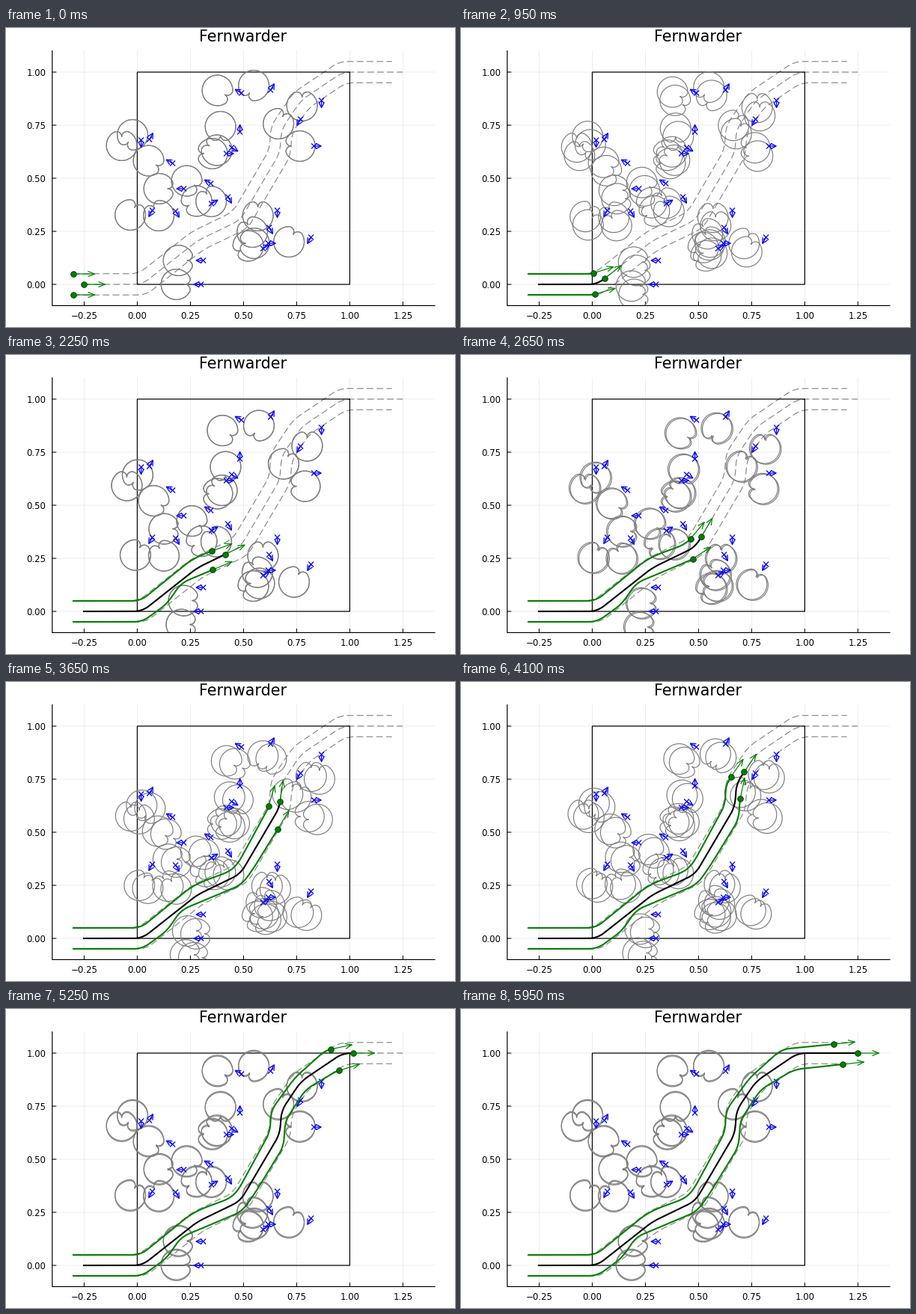
A matplotlib script for the animation above (6 s loop, 600x400 px).

```python
import numpy as np
import matplotlib.pyplot as plt
from matplotlib.animation import FuncAnimation
from matplotlib.collections import LineCollection
from matplotlib.patches import Rectangle

W, H, DPI = 600, 400, 100
FRAMES, STEP = 120, 50
PX = 72 / DPI
UNIT = 284
plt.rcParams.update({"font.family": "DejaVu Sans", "path.snap": False})

fig = plt.figure(figsize=(W / DPI, H / DPI), dpi=DPI, facecolor="white")
ax = fig.add_axes([0, 0, 1, 1])
ax.set(xlim=(0, W), ylim=(H, 0))
ax.axis("off")


def to_x(v):
    return 175.4 + UNIT * v


def to_y(v):
    return 343 - UNIT * v


def line(x, y, color, width, **kw):
    return ax.plot(x, y, color=color, lw=width * PX, **kw)[0]


# Plot frame, grid and labels
LEFT, RIGHT, TOP, BOTTOM = to_x(-0.4), to_x(1.4), to_y(1.1), to_y(-0.1)
for v in np.arange(-0.25, 1.3, 0.25):
    x = to_x(v)
    line([x, x], [TOP, BOTTOM], "black", 0.7, alpha=0.1, zorder=0)
    line([x, x], [BOTTOM, BOTTOM - 5], "black", 1)
    ax.text(x, 384, f"{v:.2f}".replace("-", "\u2212"), size=11.8 * PX,
            ha="center", va="center_baseline")
for v in np.arange(0, 1.1, 0.25):
    y = to_y(v)
    line([LEFT, RIGHT], [y, y], "black", 0.7, alpha=0.1, zorder=0)
    line([LEFT, LEFT + 5], [y, y], "black", 1)
    ax.text(53.5, y, f"{v:.2f}", size=11.8 * PX, ha="right", va="center_baseline")
line([LEFT, LEFT, RIGHT], [TOP, BOTTOM, BOTTOM], "black", 1.2)
ax.text(316.5, 18, "Fernwarder", size=20.6 * PX, ha="center")
ax.add_patch(Rectangle((to_x(0), to_y(1)), UNIT, UNIT, fill=False, lw=1.2 * PX, zorder=2))


# Paths
def rounded(points, cut=12):
    """Polyline with rounded corners, evenly spaced along its length."""
    p = np.array(points, float)
    u = np.linspace(0, 1, 12)[:, None]
    parts = [p[:1]]
    for a, b, c in zip(p, p[1:], p[2:]):
        start = b + (a - b) * min(0.5, cut / np.hypot(*(a - b)))
        end = b + (c - b) * min(0.5, cut / np.hypot(*(c - b)))
        parts.append((1 - u) ** 2 * start + 2 * u * (1 - u) * b + u ** 2 * end)
    p = np.vstack(parts + [p[-1:]])
    s = np.r_[0, np.cumsum(np.hypot(*np.diff(p, axis=0).T))]
    even = np.linspace(0, s[-1], int(2 * s[-1]))
    return np.c_[np.interp(even, s, p[:, 0]), np.interp(even, s, p[:, 1])]


def beside(points, gap):
    """Parallel polyline, its ends trailing by the same gap."""
    p = np.array(points, float)
    d = np.diff(p, axis=0)
    n = np.c_[-d[:, 1], d[:, 0]] / np.hypot(*d.T)[:, None]
    a, b = np.vstack([n[:1], n]), np.vstack([n, n[-1:]])
    q = p + gap * (a + b) / (1 + (a * b).sum(1))[:, None]
    q[[0, -1], 0] -= abs(gap)
    return q


SPINE = [(104, 343), (182, 343), (255, 285), (313, 257), (366, 167),
         (368, 136), (394, 97), (450, 59), (530, 59)]
UPPER = [(90, 329), (180, 329), (245, 276), (262, 267), (298, 254), (310, 243),
         (353, 164), (354, 136), (385, 93), (428, 54), (498, 47)]
LOWER = [(90, 357), (182, 357), (215, 333), (234, 305), (258, 295), (315, 271),
         (331, 249), (371, 184), (373, 150), (400, 108), (445, 81), (510, 74)]

for gap in (-14.2, 0, 14.2):
    line(*rounded(beside(SPINE, gap)).T, "gray", 1.1, zorder=1,
         dashes=(8, 4), dash_capstyle="butt")


def arrow(tip, d, length, half):
    """Open arrow head as one polyline."""
    a = np.arctan2(d[1], d[0])
    left, right = (tip - length * np.array([np.cos(a + h), np.sin(a + h)])
                   for h in (half, -half))
    return np.array([left, tip, right])


class Vehicle:
    """Runs its path at constant speed and leaves a trail."""

    def __init__(self, points, color):
        self.path = rounded(points)
        self.trail = line([], [], color, 2.1, zorder=4)
        self.shaft = line([], [], "green", 1.2, zorder=5)
        self.head = line([], [], "green", 1.2, zorder=5)
        self.dot = line([], [], "green", 1, marker="o", ms=7.6 * PX,
                        mec="#003800", mew=0.9 * PX, zorder=6)

    def update(self, part):
        last = len(self.path) - 1
        i = round(part * last)
        pos = self.path[i]
        d = self.path[min(i + 10, last)] - self.path[max(i - 4, 0)]
        tip = pos + 28.4 * d / np.hypot(*d)
        self.trail.set_data(*self.path[:i + 1].T)
        self.shaft.set_data(*np.array([pos, tip]).T)
        self.head.set_data(*arrow(tip, d, 9, 0.38).T)
        self.dot.set_data([pos[0]], [pos[1]])


vehicles = [Vehicle(UPPER, "green"), Vehicle(SPINE, "black"), Vehicle(LOWER, "green")]

# Intruders: x, y and heading as an hour on the clock
INTRUDERS = np.array([
    (181, 150, 6), (192, 149, 1), (223, 181, 10), (238, 215, 9), (274, 208, 10),
    (196, 244, 7), (227, 245, 5), (275, 235, 2), (297, 226, 5), (264, 311, 9),
    (261, 343, 9), (363, 244, 6), (352, 267, 5), (351, 288, 3), (344, 295, 2),
    (408, 280, 7), (354, 83, 1), (315, 87, 10), (313, 139, 0), (422, 97, 6),
    (394, 122, 7), (412, 158, 3), (302, 160, 4), (295, 168, 3)])
SPOTS = INTRUDERS[:, :2] - [0.4, 0]
TURN = np.radians(30 * INTRUDERS[:, 2] - 90)
HEADS = np.c_[np.cos(TURN), np.sin(TURN)]

marks = []
for p, d in zip(SPOTS, HEADS):
    tip = p + 9.5 * d
    marks += [p + [(-3.5, -3.5), (3.5, 3.5)], p + [(-3.5, 3.5), (3.5, -3.5)],
              np.array([p, tip]), arrow(tip, d, 8, 0.48)]
ax.add_collection(LineCollection(marks, colors="blue", linewidths=1.3 * PX, zorder=3.5))


# Reach sets: a disc whose rear curls into two lobes that meet in a cusp
def heart(size=20.4, lobe=7):
    reach = size - lobe
    back = np.pi - np.arcsin(lobe / reach)
    a, b = np.linspace(0, back, 50), np.linspace(back, 1.5 * np.pi, 20)
    rim = size * np.exp(1j * a)
    curl = reach * np.exp(1j * back) + lobe * np.exp(1j * b)
    half = np.r_[rim, curl]
    return np.r_[half, half.conj()[::-1]]


SETS = []
for p, d, a in zip(SPOTS, HEADS, TURN):
    z = heart() * np.exp(1j * a)
    SETS.append(p + 7 * d + np.c_[z.real, z.imag])
SETS = np.array(SETS)

reach_lines = LineCollection([], colors="gray", linewidths=1.2 * PX, zorder=3)
ax.add_collection(reach_lines)
reach_lines.set_clip_path(Rectangle((LEFT, TOP), RIGHT - LEFT, BOTTOM - TOP,
                                    transform=ax.transData))


def wind(t):
    """Low and high wind angle in degrees: one slow swing, a pulsing spread."""
    u = np.clip((t - 0.68) / 4.5, 0, 1)
    low = 60 * np.sin(np.pi * u ** 1.3)
    spread = 28 * np.sin(np.pi * (t - 2.225) / 2.85) ** 2 * min(1, 16 * u) * (u < 1)
    return low, low + spread - 3 * u


def drifted(angle):
    a = np.radians(angle)
    return SETS + 26 * np.array([-np.cos(a), np.sin(a)])


def update(k):
    low, high = wind(k * STEP / 1000)
    reach_lines.set_segments([*drifted(low), *drifted(high)])
    for v in vehicles:
        v.update(k / (FRAMES - 1))
    return []


anim = FuncAnimation(fig, update, frames=FRAMES, interval=STEP, repeat=True, repeat_delay=0)
plt.show()
```
